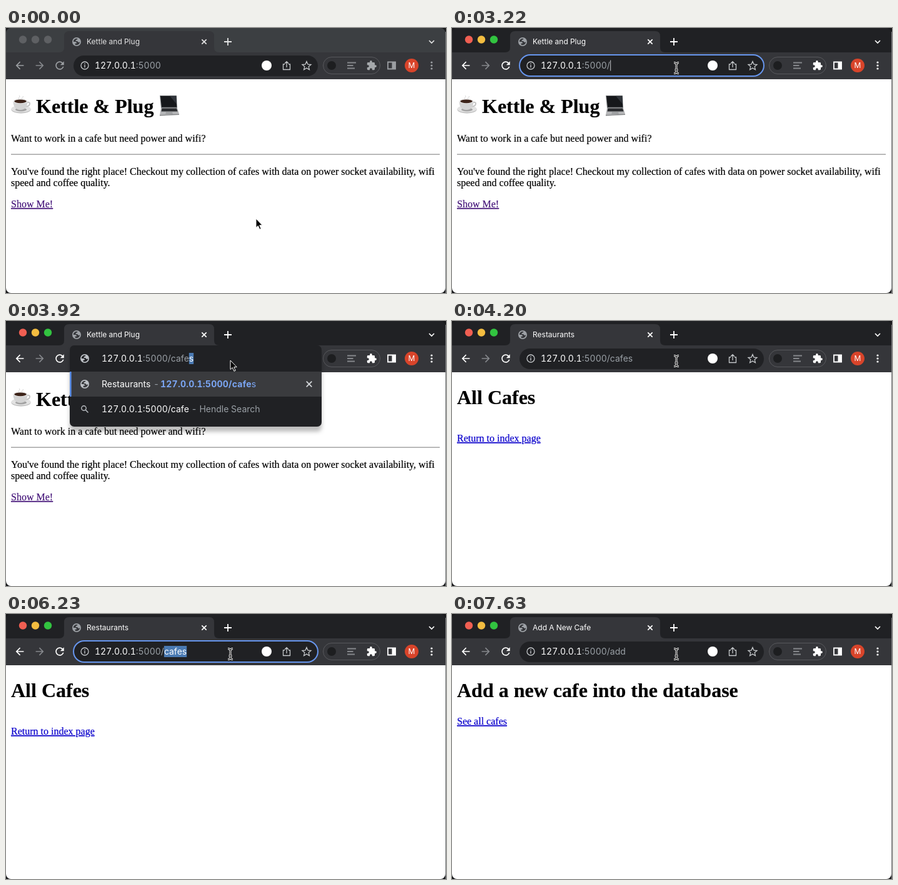
An HTML page for the animation above (8000 ms loop, 704 px wide and 424 px high).

```html
<!DOCTYPE html>
<html lang="en">
<head>
<meta charset="utf-8">
<title>Browser walkthrough</title>
<style>
  html, body { margin: 0; width: 100%; height: 100%; overflow: hidden; background: #17181a; }
  svg { display: block; width: 100%; height: 100%; }
  text { white-space: pre; }
  .ui { font: 14px Inter, "Open Sans", sans-serif; font-variant-numeric: tabular-nums; fill: #fff; }
  .tab { font-size: 12px; }
  .bold { font-weight: 700; letter-spacing: .25px; }
  .strong { font-weight: 700; }
  .grey { fill: #9aa0a6; }
  .blue { fill: #7ba6f4; }
  .page { font: 16px "Liberation Serif", "Times New Roman", serif; fill: #000; }
  .page text { stroke: #000; stroke-width: .2; }
  .page .h1 { font-size: 32px; font-weight: 700; }
  .page .link { fill: #0a00cc; stroke: #0a00cc; text-decoration: underline; }
  .page .seen { fill: #45157a; stroke: #45157a; }
  #menu { filter: drop-shadow(0 8px 3px rgba(0, 0, 0, .26)); }
</style>
</head>
<body>
<svg viewBox="0 0 704 424" xmlns="http://www.w3.org/2000/svg">
  <defs>
    <clipPath id="frame"><rect width="703" height="424" rx="8"/></clipPath>
    <path id="globe" fill-rule="evenodd" d="M12 2a10 10 0 1 0 0 20a10 10 0 1 0 0-20zM4.500 12H8.700c2.300 0 3.500 1.200 3.500 3.600H8.600v3.100A7.500 7.500 0 0 0 19.500 12c-.5.800-1.400 1.200-2.500 1.200-1.800 0-2.700-.900-2.700-2.700H10.100V8.700c0-.900.500-1.400 1.400-1.400h1.400c0-1.100.500-1.900 1.600-2.400A7.500 7.500 0 0 0 4.500 12z"/>
    <path id="back" d="M20 11H7.830l5.590-5.590L12 4l-8 8 8 8 1.410-1.410L7.830 13H20z"/>
    <path id="reload" d="M17.650 6.350A7.960 7.960 0 0 0 12 4c-4.420 0-7.990 3.580-7.990 8s3.570 8 7.990 8c3.730 0 6.840-2.550 7.730-6h-2.080A5.990 5.990 0 0 1 12 18c-3.310 0-6-2.690-6-6s2.690-6 6-6c1.660 0 3.140.690 4.220 1.780L13 11h7V4z"/>
    <path id="puzzle" d="M20.500 11H19V7c0-1.100-.900-2-2-2h-4V3.500a2.500 2.500 0 0 0-5 0V5H4c-1.100 0-2 .900-2 2v3.800h1.500a2.700 2.700 0 0 1 0 5.400H2V20c0 1.100.900 2 2 2h3.800v-1.500a2.700 2.700 0 0 1 5.400 0V22H17c1.100 0 2-.900 2-2v-4h1.500a2.500 2.500 0 0 0 0-5z"/>
  </defs>
  <text id="probe" class="ui" visibility="hidden"></text>
  <rect width="704" height="424" fill="#17181a"/>
  <rect x="703" y="6" width="1" height="418" fill="#77797b"/>
  <g clip-path="url(#frame)">
    <rect y="81" width="704" height="343" fill="#fff"/>
    <g id="page" class="page"></g>
    <g id="chrome"></g>
  </g>
  <g id="menu"></g>
  <g id="pointer"></g>
</svg>
<script>
const LOOP = 8000, STEP = 70;
const HOST = '127.0.0.1', ORIGIN = HOST + ':5000';
const SITE = 'Kettle and Plug';
const $ = id => document.getElementById(id);

const widthOf = s => {
  $('probe').textContent = s;
  return s ? $('probe').getComputedTextLength() : 0;
};

const text = (x, y, s, cls = '') => `<text x="${x}" y="${y}" class="${cls}">${s}</text>`;
const span = (s, cls = '', x) => `<tspan class="${cls}"${x ? ` x="${x}"` : ''}>${s}</tspan>`;
const rect = (x, y, w, h, fill, rx = 0) =>
  `<rect x="${x}" y="${y}" width="${w}" height="${h}" rx="${rx}" fill="${fill}"/>`;
const dot = (x, y, r, fill) => `<circle cx="${x}" cy="${y}" r="${r}" fill="${fill}"/>`;
// 24-unit symbols centred on a point
const icon = (id, x, y, k, fill, flip = 1) =>
  `<use href="#${id}" fill="${fill}" transform="translate(${x} ${y}) scale(${k * flip} ${k}) translate(-12 -12)"/>`;
const stroke = (d, color, w = 1.6) =>
  `<path d="${d}" fill="none" stroke="${color}" stroke-width="${w}"/>`;
const cross = (x, y, r, color) =>
  stroke(`M${x - r} ${y - r}l${2 * r} ${2 * r}m0 ${-2 * r}l${-2 * r} ${2 * r}`, color, 1.7);

const cup = `
  <ellipse cx="24" cy="130.5" rx="15.5" ry="6" fill="#b9b9b9"/>
  <ellipse cx="24" cy="129.5" rx="15.5" ry="5.6" fill="#e2e2e2"/>
  <ellipse cx="24" cy="130.5" rx="9" ry="3" fill="#a4a4a4"/>
  <path d="M33 119c7-2 7 6-2 7" fill="none" stroke="#c4c4c4" stroke-width="2"/>
  <path d="M11.5 117c0 9 4 14 11.5 14s11.5-5 11.5-14z" fill="#d4d4d4"/>
  <ellipse cx="23" cy="117" rx="11.5" ry="3.8" fill="#ededed"/>
  <ellipse cx="23" cy="117.3" rx="9.8" ry="2.9" fill="#3d241a"/>
  <path d="M21 114c-3-3 3-3 0-6m5 6c-3-3 3-2 1-5" fill="none" stroke="#d4d4d4"/>`;

const laptop = `
  <path d="M246 108h27l1 20h-26z" fill="#85878a"/>
  <path d="M247 108.8h25.3l1 18h-24.3z" fill="#16181b"/>
  <path d="M262 108.8h10.300l.7 13z" fill="#30343a"/>
  <path d="M248 128h26l3 9.500-31 1.500z" fill="#b4b5b7"/>
  <path d="M249.500 128.500h23.500l1.500 5h-26z" fill="#2a2c2f"/>
  <path d="M256 134.500h10l.8 3h-11.500z" fill="#999b9d"/>
  <path d="M246 139l31-1.500v1.500l-31 1.500z" fill="#808284"/>`;

const pages = {
  home: {
    title: SITE,
    body: cup + text(48, 135.5, 'Kettle &amp; Plug', 'h1') + laptop +
      text(8, 182, 'Want to work in a cafe but need power and wifi?') +
      rect(8, 201.5, 686, 1.3, '#959595') +
      text(8, 235, "You've found the right place! Checkout my collection of cafes with data on power socket availability, wifi") +
      text(8, 253, 'speed and coffee quality.') +
      text(8, 287, 'Show Me!', 'link seen')
  },
  cafes: {
    title: 'Restaurants',
    body: text(8, 132.5, 'All Cafes', 'h1') + text(8, 193, 'Return to index page', 'link')
  },
  add: {
    title: 'Add A New Cafe',
    body: text(8, 132.5, 'Add a new cafe into the database', 'h1') + text(8, 177, 'See all cafes', 'link')
  }
};

// sel: index where the selection starts (it runs to the end), or -1
const cues = [
  [0, { page: 'home', path: '', active: false, focus: false, menu: false, sel: -1, typed: '', shape: 'arrow', ring: false }],
  [1890, { shape: 'beam' }],
  [2030, { ring: true }],
  [2170, { ring: false, active: true }],
  [2240, { focus: true }],
  [2310, { sel: 0 }],
  [2660, { sel: -1, ring: true }],
  [2730, { ring: false }],
  [3220, { path: '/', typed: '/' }],
  [3290, { menu: true, shape: 'arrow' }],
  ...typing('/cafes', [3430, 3570, 3710, 3850, 3990]),
  [4130, { menu: false, focus: false }],
  [4200, { page: 'cafes', shape: 'beam' }],
  [5600, { focus: true }],
  [5740, { sel: 0, ring: true }],
  [5810, { ring: false }],
  [6160, { sel: ORIGIN.length + 1, ring: true }],
  [6230, { ring: false }],
  ...typing('/add', [6860, 7070, 7210]),
  [6930, { menu: true, shape: 'arrow' }],
  [7560, { menu: false, focus: false }],
  [7630, { page: 'add', shape: 'beam' }]
].sort((a, b) => a[0] - b[0]);

// each key press moves the start of the selected inline completion
function typing(path, times) {
  return times.map((t, i) => {
    const typed = path.slice(0, i + 2);
    return [t, { path, typed, sel: typed === path ? -1 : ORIGIN.length + typed.length }];
  });
}

const stateAt = t => Object.assign({}, ...cues.filter(c => c[0] <= t).map(c => c[1]));

function address(x, s) {
  const rest = ':5000' + s.path;
  const cut = s.sel < 0 ? rest.length : Math.max(0, s.sel - HOST.length);
  const end = x + widthOf(HOST + rest);
  let out = '';
  if (s.sel >= 0) {
    const from = x + widthOf((HOST + rest).slice(0, s.sel));
    out += rect(from, 51, end - from, 18, '#4a7ab3');
  } else if (s.focus) out += rect(end + .3, 51.5, 1, 17, '#c4c7ca');
  return out + text(x, 65, span(HOST) + span(rest.slice(0, cut), 'grey') + span(rest.slice(cut)), 'ui');
}

function chrome(s) {
  const on = s.active, ink = on ? '#fff' : '#9b9ea2', bar = '#35363a';
  const lights = on ? ['#f05f52', '#f4bd40', '#32c440'] : Array(3).fill('#5e6063');
  const small = '#c4c7ca';
  let out = rect(0, 0, 704, 40, on ? '#202124' : '#3c3f42') + rect(0, 39, 704, 43, bar);
  out += `<path d="M85 39q8 0 8-8V13q0-8 8-8H325q8 0 8 8V31q0 8 8 8z" fill="${bar}"/>`;
  lights.forEach((c, i) => out += dot(27 + 20 * i, 18.5, 6.2, c));
  out += icon('globe', 113, 22, .7, '#9da1a6');
  out += `<g opacity="${on ? 1 : .86}">` + text(129, 26, pages[s.page].title, 'ui tab') +
    cross(317, 22, 3.7, '#fff') + stroke('M349 22h12m-6-6v12', '#fff', 1.8) +
    stroke('M677 20l4 4 4-4', '#fff', 1.7) + '</g>';
  out += icon('back', 22, 60, .8, ink) + icon('back', 54, 60, .8, '#85888c', -1) + icon('reload', 86, 60, .84, ink);
  out += rect(108, 44, 391, 33, '#202124', 16.5);
  if (s.focus && !s.menu)
    out += `<rect x="108" y="43" width="391" height="34" rx="17" fill="none" stroke="#6796ee" stroke-width="2"/>`;
  out += `<circle cx="126" cy="60" r="6" fill="none" stroke="${small}" stroke-width="1.3"/>` +
    rect(125.3, 59, 1.4, 4.3, small) + rect(125.3, 56.5, 1.4, 1.5, small);
  if (!s.menu) out += address(142, s);
  out += dot(417, 60, 8, '#fff');
  out += stroke('M446 58h-2.500v8.500h11V58H452M449 63v-9m-3 2.700l3-3 3 3', small, 1.3);
  out += stroke('M481 53.500l2 4.600 5 .4-3.800 3.300 1.200 4.900-4.400-2.600-4.400 2.600 1.200-4.900L474 58.500l5-.4z', small, 1.3);
  out += `<rect x="507.5" y="46.5" width="91" height="27" rx="13.5" fill="${bar}" stroke="#58595d"/>`;
  out += dot(521, 60, 7, '#1d1e20');
  out += stroke('M546 55.500h14m-14 4.500h9.500m-9.500 4.500h12', '#85878b', 2);
  out += icon('puzzle', 585, 60, .72, on ? '#fff' : '#a5a8ab');
  out += stroke('M611 54.500h12v11h-12z', ink, 1.8) + rect(617.5, 54, 6, 12, ink);
  out += dot(649, 60, 11, '#d8442a') +
    `<text x="649" y="64.3" text-anchor="middle" class="ui tab">M</text>`;
  [55, 60, 65].forEach(y => out += dot(681, y, 1.6, ink));
  return out;
}

function rowsFor(typed) {
  const dash = x => span('-', 'grey', x);
  const url = (x, bold, rest = '') => span(ORIGIN + bold, 'blue bold', x) + span(rest, 'blue');
  const search = span(ORIGIN + typed) + span(' - Hendle Search', 'grey');
  const key = typed.slice(1);
  if (!key) return [
    span(SITE) + dash(259) + url(270, ''),
    search,
    span('Restaurants') + dash(236) + url(247, '/', 'cafes'),
    span('Add A New Cafe') + dash(265) + url(276, '/', 'add'),
    url(153, '/', '6')
  ];
  const n = key.length;
  if (key[0] === 'c') return [
    span('Restaurants') + dash(236) + url(247, typed, 'cafes'.slice(n)), search
  ];
  return [
    span('Add'.slice(0, n), 'strong') + span('Add A New Cafe'.slice(n)) + dash(266) +
      url(277, typed, 'add'.slice(n)),
    search
  ];
}

function menu(s) {
  if (!s.menu) return '';
  const rows = rowsFor(s.typed), grey = '#bdc1c6';
  let out = rect(102, 39, 403, 50 + 40 * rows.length, '#202124', 7);
  out += rect(102, 81, 403, 40, '#3a3b3e') + rect(102, 81, 2.6, 40, '#5b8ee8');
  out += icon('globe', 126, 60, .7, grey) + address(153, s);
  rows.forEach((row, i) => {
    const y = 101 + 40 * i;
    out += i === 1
      ? `<circle cx="124.5" cy="${y - 1.5}" r="3.7" fill="none" stroke="${grey}" stroke-width="1.4"/>` +
        stroke(`M127 ${y + 1}l4.500 4.500`, grey, 1.5)
      : icon('globe', 126, y, .7, grey);
    out += text(153, y + 5, row, 'ui');
  });
  return out + cross(485, 101, 4.3, '#d5d8db');
}

function pointer(s) {
  let out = '';
  if (s.ring) out = `<g fill="none"><circle r="16.5" stroke="#fff" stroke-width="3.2"/>
    <circle r="16.5" stroke="#111" stroke-width="1.3"/></g>`;
  if (s.shape === 'arrow')
    return out + `<path d="M0 0V14.500L3.300 11.500 5.900 17.300 8.200 16.300 5.700 10.700H10.200Z" fill="#000" stroke="#fff"/>`;
  const beam = 'M-4-8.500Q0-8.500 0-5.500V5.500Q0 8.500-4 8.500M4-8.500Q0-8.500 0-5.500V5.500Q0 8.500 4 8.500M-2.500 3H2.500';
  return out + stroke(beam, '#fff', 3) + stroke(beam, '#111', 1.1);
}

function pointerAt(t, s) {
  const tick = Math.floor(t / STEP) * STEP;
  if (tick < 1890) {
    const k = Math.min(1, Math.max(0, (tick - 1400) / 280));
    const e = k * k * (3 - 2 * k);
    return [400 - 41 * e, 305 - 230 * e];
  }
  if (tick < 1960) return [359, 68];
  return [359, s.shape === 'arrow' ? 63 : 64];
}

const drawn = {};
function put(id, html) {
  if (drawn[id] !== html) $(id).innerHTML = drawn[id] = html;
}

function render(t) {
  const s = stateAt(t);
  put('page', pages[s.page].body);
  put('chrome', chrome(s));
  put('menu', menu(s));
  put('pointer', pointer(s));
  $('pointer').setAttribute('transform', `translate(${pointerAt(t, s)})`);
}

const start = performance.now();
function loop() {
  render((performance.now() - start) % LOOP);
  requestAnimationFrame(loop);
}
loop();
</script>
</body>
</html>
```
